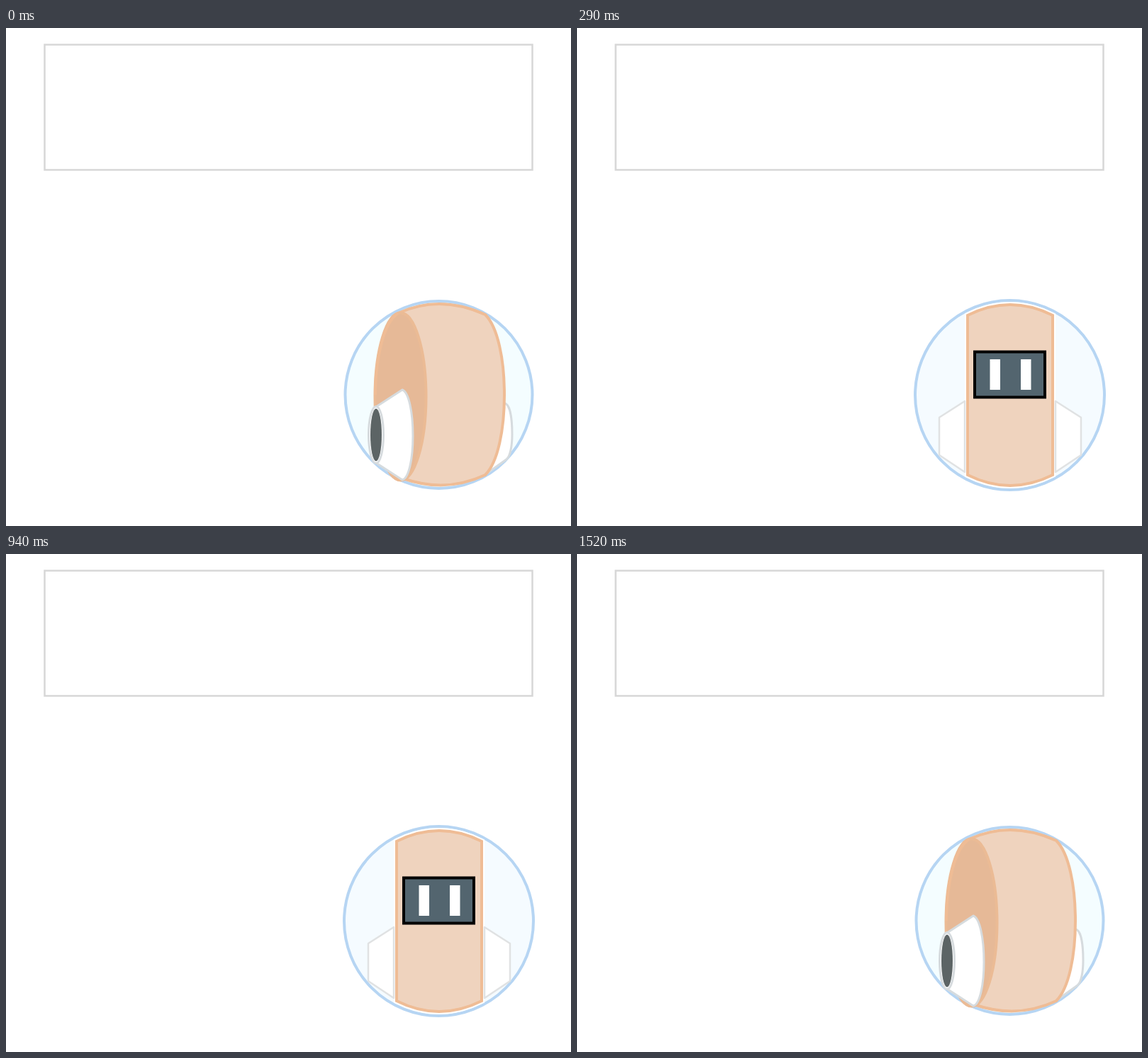
An HTML page for the animation above (1600 ms loop, 797 by 702 pixels).

```html
<!DOCTYPE html>
<html lang="en">
<head>
<meta charset="utf-8">
<title>Turning robot</title>
<style>
  html, body { margin: 0; width: 100%; height: 100%; overflow: hidden; background: #fff; }
  svg { display: block; width: 100vw; height: 100vh; }
  .pose { display: none; }
  .glass { fill: #f4fdff; stroke: #b6d5f3; stroke-width: 4; }
  .body { fill: #efd3be; stroke: #efbc95; stroke-width: 4; stroke-linejoin: round; }
  .side { fill: #e6b997; stroke: #ebbb95; stroke-width: 4; }
  .ear { fill: #fff; stroke: #d6dbde; stroke-width: 3; stroke-linejoin: round; }
  .pad { fill: #5c6465; }
  .screen { fill: #5c6465; stroke: #000; stroke-width: 4; }
  .eye { fill: #fff; }
  #front .glass { fill: #f5fbff; }
  #front .ear { stroke: #e0e2e3; stroke-width: 2.5; }
  #front .screen { fill: #53656f; }
  #heart { fill: #f4ae82; }
</style>
</head>
<body>
<svg viewBox="0 0 797 702">
  <rect x="54.5" y="23.5" width="688" height="176.5" fill="none" stroke="#d7d7d7" stroke-width="2.5"/>

  <g class="pose" id="left">
    <circle class="glass" cx="610.5" cy="517" r="132"/>
    <path class="ear" d="M703 529C712 530 714 555 714 573C714 590 711 604 706 608L678 628"/>
    <path class="body" d="M553 402Q612 375 676 404C694 422 703 468 703 517C703 566 694 612 676 630Q620 656 560 635Z"/>
    <ellipse class="side" cx="556.5" cy="519.5" rx="36" ry="118"/>
    <path class="body" style="fill:none" d="M521 517C521 465 533 415 553 402"/>
    <path class="ear" d="M522 534L559 510C568 513 574 541 574 575C574 608 568 635 559 637L522 613Z"/>
    <ellipse class="ear" cx="522" cy="573.5" rx="10.5" ry="40"/>
    <ellipse class="pad" cx="522" cy="573.5" rx="8" ry="37"/>
  </g>

  <g class="pose" id="right">
    <circle class="glass" cx="610.5" cy="518" r="132"/>
    <path class="ear" d="M519 529C510 531 508 555 508 573C508 590 511 603 515 607L546 630"/>
    <path class="body" d="M545 404Q608 375 676 404L661 638Q604 656 547 631C528 612 519 566 519 517C519 468 528 422 545 404Z"/>
    <ellipse class="side" cx="665" cy="520" rx="35.5" ry="118"/>
    <path class="body" style="fill:none" d="M670 402C688 412 701 465 701 522"/>
    <path class="ear" d="M700 534L663 511C654 514 648 541 648 575C648 608 654 635 663 638L700 613Z"/>
    <ellipse class="ear" cx="700" cy="574" rx="10.5" ry="40"/>
    <ellipse class="pad" cx="700" cy="574" rx="8" ry="37"/>
    <path class="screen" d="M536 452H617L611 502H530Z"/>
    <path class="eye" d="M546 459H557L551 495H540ZM577 459H591L586 495H572Z"/>
  </g>

  <g class="pose" id="front">
    <circle class="glass" cx="610.5" cy="517.5" r="133.5"/>
    <path d="M551 405Q611 375 671 405V630Q611 660 551 630Z" fill="none" stroke="#fff" stroke-width="8"/>
    <path class="ear" d="M547 526L511 549V602L547 626ZM675 526L711 549V602L675 626Z"/>
    <path class="body" d="M551 405Q611 375 671 405V630Q611 660 551 630Z" style="stroke-linejoin:miter"/>
    <rect class="screen" x="561" y="456.5" width="99" height="64"/>
    <path class="eye" d="M582.5 467H597V510H582.5ZM626 467H640.5V510H626Z"/>
  </g>

  <polygon id="heart"/>
</svg>
<script>
  const LOOP = 1600;
  const HEART_START = 620, HEART_STEP = 80, HEART_STEPS = 4;
  const poses = [...document.querySelectorAll('.pose')];
  const heart = document.getElementById('heart');

  // Heart outline with a slightly ragged edge.
  heart.setAttribute('points', Array.from({ length: 80 }, (_, i) => {
    const a = i / 80 * 2 * Math.PI;
    const ragged = i % 4 < 2 ? 1.03 : 0.95;
    const x = 16 * Math.sin(a) ** 3;
    const y = 5 * Math.cos(2 * a) + 2 * Math.cos(3 * a) + Math.cos(4 * a) - 13 * Math.cos(a);
    return `${(x * ragged).toFixed(2)},${(y * ragged).toFixed(2)}`;
  }).join(' '));

  function poseAt(t) {
    if (t < 40 || t >= 1520) return 'left';
    return t < 290 || t >= 1270 ? 'right' : 'front';
  }

  function draw(now) {
    const t = now % LOOP;
    const current = poseAt(t);
    for (const pose of poses) pose.style.display = pose.id === current ? 'inline' : 'none';

    const step = Math.floor((t - HEART_START) / HEART_STEP);
    const visible = step >= 0 && step < HEART_STEPS;
    heart.style.display = visible ? 'inline' : 'none';
    if (visible) {
      const k = step / (HEART_STEPS - 1);
      heart.setAttribute('transform',
        `translate(${662.5 + 82 * k} ${367.5 - 67 * k}) rotate(27) scale(${0.66 + 2.6 * k})`);
    }
  }

  const start = performance.now();
  function tick() {
    draw(performance.now() - start);
    requestAnimationFrame(tick);
  }
  tick();
</script>
</body>
</html>
```
